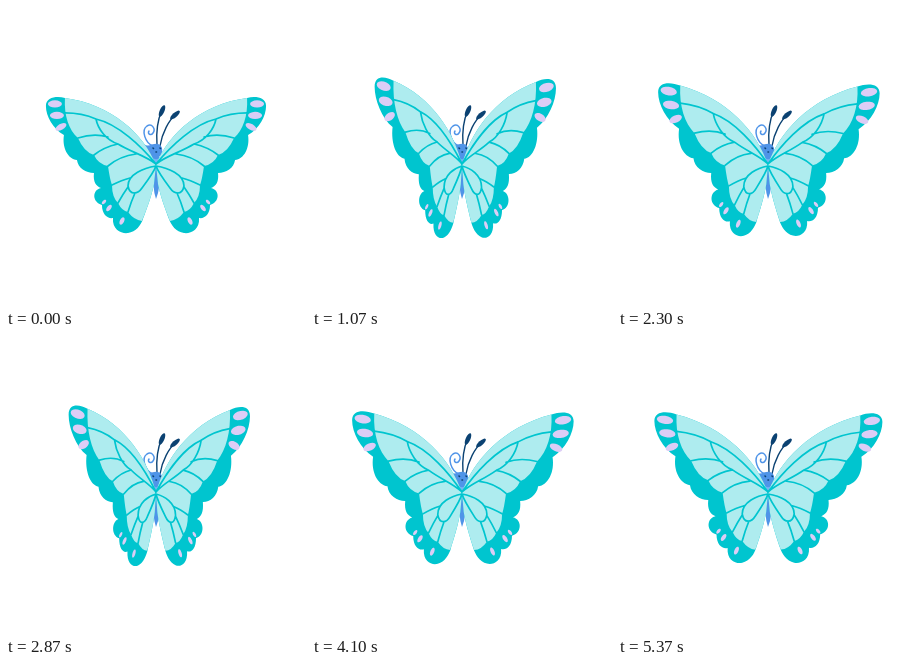
An HTML page with a canvas for the animation above (5410 ms loop, 300 by 300 pixels).

```html
<!DOCTYPE html>
<html>
<head>
<meta charset="utf-8">
<style>
html, body { margin: 0; width: 100%; height: 100%; overflow: hidden; background: #fff; }
canvas { display: block; width: 300px; height: 300px; }
</style>
</head>
<body>
<canvas id="stage" width="300" height="300"></canvas>
<script>
const ctx = document.getElementById('stage').getContext('2d');
const TEAL = '#00c5cf', PALE = '#aeecef', PINK = '#dccdf6';
const BLUE = '#4f94e8', NAVY = '#0b4272';
const LOOP = 5410, CYCLE = 54, DEPTH = 360;

// Wing coordinates: x runs outward from the body, y downward from the joint.
const topEdge = 'M0,1 C12,-30 45,-60 91,-66 ';
const innerEdge = 'C12,52 5,35 2,20 Z';
const outline = topEdge +
  'C99,-68 110,-67 110,-58 C110,-48 103,-35 92,-29 C94,-16 88,-5 79,-4 ' +
  'C78,4 70,9 62,9 C63,18 60,22 55,24 C64,26 64,38 54,41 ' +
  'C54,51 48,55 43,54 C44,66 34,70 28,69 C20,68 15,61 13,55 ' + innerEdge;
const panel = topEdge +
  'C92,-48 87,-34 78,-26 Q72,-12 62,-9 Q58,0 48,2 Q46,16 44,21 ' +
  'Q44,33 38,39 Q34,47 28,48 Q22,56 14,57 ' + innerEdge;
const veins =
  'M0,0 C15,-18 38,-40 60,-45 C58,-35 50,-24 38,-20 C25,-12 10,-8 0,0 ' +
  'M60,-45 Q74,-51 91,-51 M48,-27 Q62,-31 78,-26 M38,-20 Q52,-17 62,-9 ' +
  'M20,-10 Q36,-8 48,2 M0,2 C12,4 28,10 28,22 C26,32 18,30 14,24 C8,16 2,8 0,2 ' +
  'M26,14 Q34,16 44,21 M28,23 Q33,30 38,39 M21,29 Q25,38 28,48';

// x, y, half length, half width, tilt
const marks = [
  [101, -60, 7, 3.6, 0], [99, -48.5, 7, 3.6, 0], [95, -37, 6, 3, 0.5],
  [52, 38, 2.8, 1.5, 0.8], [47, 44, 3.8, 2, 0.9], [34, 57, 4, 2.1, 1.1]
].map(([x, y, a, b, tilt]) => {
  let d = '';
  for (let i = 0; i < 16; i++) {
    const u = i * Math.PI / 8;
    const p = a * Math.cos(u), q = b * Math.sin(u);
    const px = x + p * Math.cos(tilt) - q * Math.sin(tilt);
    const py = y + p * Math.sin(tilt) + q * Math.cos(tilt);
    d += (i ? 'L' : 'M') + px.toFixed(2) + ',' + py.toFixed(2) + ' ';
  }
  return d + 'Z';
}).join(' ');

const bodyShape = 'M138,138 C143,142 146,137 152,138 C157,139 158,147 153,151 ' +
  'Q156,157 153,166 Q155,181 150,193 Q146,181 148,165 Q147,157 146,151 Q140,147 138,138 Z';
const curl = 'M147,140 C139,137 135,124 141,120 C146,117 150,123 147,127 C145,130 141,128 143,125';

function fill(d, color) {
  ctx.fillStyle = color;
  ctx.fill(new Path2D(d));
}

function stroke(d, color, width) {
  ctx.strokeStyle = color;
  ctx.lineWidth = width;
  ctx.stroke(new Path2D(d));
}

function club(x, y, angle) {
  ctx.fillStyle = NAVY;
  ctx.beginPath();
  ctx.ellipse(x, y, 2.3, 6.2, angle, 0, 7);
  ctx.fill();
}

function drawBody() {
  stroke(curl, BLUE, 1.5);
  stroke('M151,139 C150,126 152,113 156,104', NAVY, 1.4);
  stroke('M154,140 C156,127 163,114 170,108', NAVY, 1.4);
  club(156, 105, 0.42);
  club(169, 109, 0.85);
  fill(bodyShape, BLUE);
  fill('M147,152 Q151,155 154,151 Q154,157 150,160 Z', '#78b4f4');
  stroke('M147,142 l0.5,0.5 M154,142 l0.5,0.5 M150,146 l0.5,0', NAVY, 1.6);
}

// Swing the wing about the body axis, seen in perspective.
function project(d, side, angle, pitch) {
  const sin = Math.sin(angle), cos = Math.cos(angle);
  return d.replace(/(-?[\d.]+),(-?[\d.]+)/g, (_, x, y) => {
    const z = x * sin, k = DEPTH / (DEPTH - z);
    return (150 + side * x * cos * k).toFixed(2) + ',' + (158 + (y - z * pitch) * k).toFixed(2);
  });
}

function drawWing(side, angle, pitch) {
  const p = d => project(d, side, angle, pitch);
  fill(p(outline), TEAL);
  fill(p(panel), PALE);
  stroke(p(veins), TEAL, 1.7);
  fill(p(marks), PINK);
}

function draw(now) {
  const step = Math.min(161, Math.floor((now % LOOP + 3.4) * 0.03));
  const f = step % CYCLE;
  const phase = (145 + 20.97 * f - 0.0264 * f * f) * Math.PI / 180;
  const angle = (37 + 45 * Math.cos(phase)) * Math.PI / 180;
  const pitch = 0.03 * (1 + Math.cos(2 * Math.PI * f / CYCLE));
  ctx.fillStyle = '#fff';
  ctx.fillRect(0, 0, 300, 300);
  ctx.lineCap = ctx.lineJoin = 'round';
  drawBody();
  drawWing(-1, angle, pitch);
  drawWing(1, angle * 0.92, pitch); // the right wing swings a little less
}

const start = performance.now();
function tick() {
  draw(performance.now() - start);
  requestAnimationFrame(tick);
}
tick();
</script>
</body>
</html>
```
